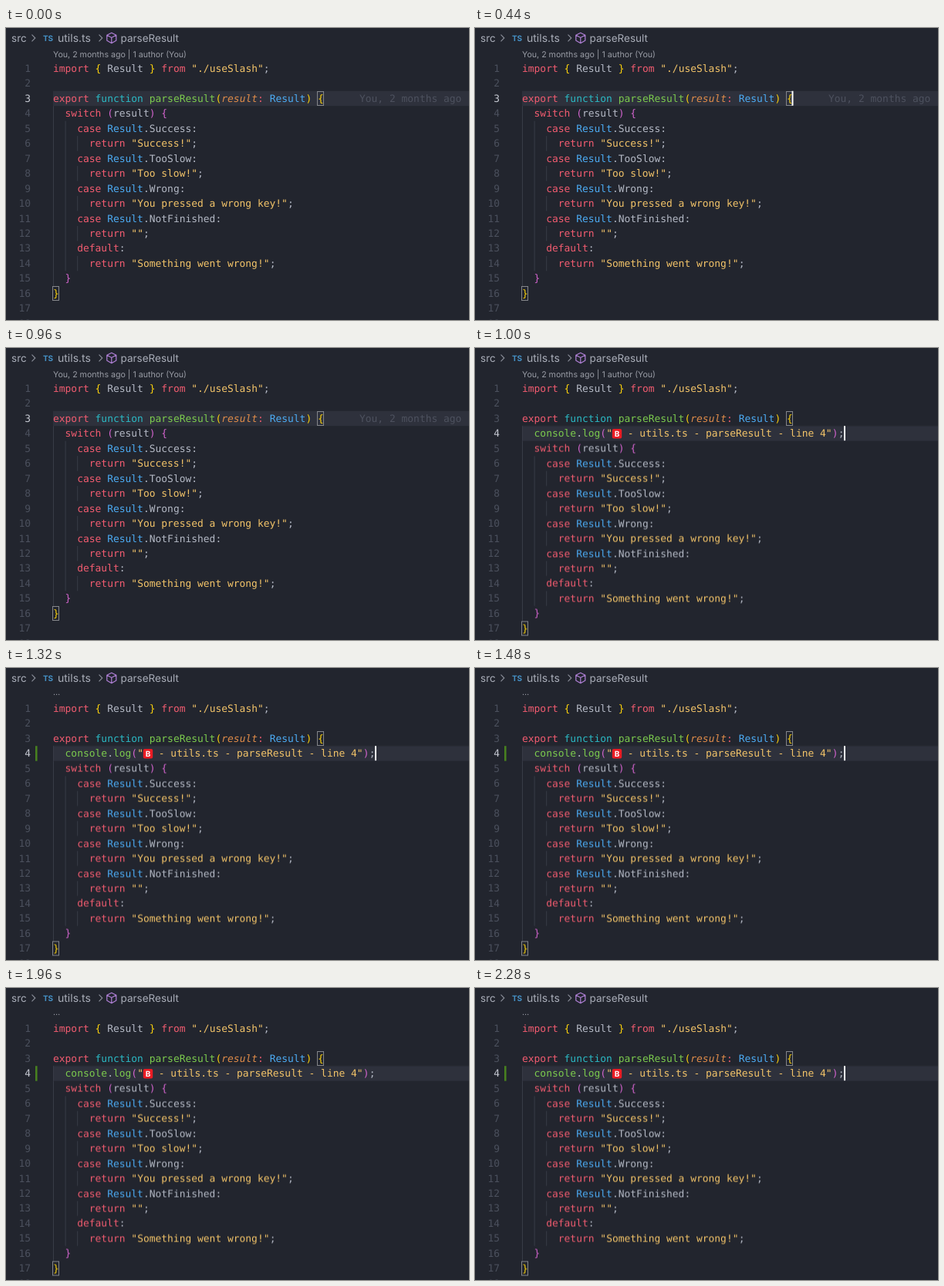
Write an HTML page that moves like this. It is 600 px wide and 379 px high and loops after 2.32 s.

```html
<!DOCTYPE html>
<html lang="en">
<head>
<meta charset="utf-8">
<style>
  html, body { margin: 0; width: 100%; height: 100%; overflow: hidden; background: #22252e; }
  svg { display: block; width: 600px; height: 379px; }
  text { white-space: pre; text-rendering: geometricPrecision; }
  .code { font: 12.95px "DejaVu Sans Mono", "Liberation Mono", monospace; }
  .ui { font-family: Inter, "Open Sans", sans-serif; }
  .w { fill: #b4b9c5; }
  .r { fill: #f25c70; }
  .g { fill: #7ccb4e; }
  .y { fill: #f3c469; }
  .b { fill: #4cabf3; }
  .c { fill: #2bbac5; }
  .o { fill: #e08c4a; font-style: italic; }
  .k { fill: #fbd20c; }
  .p { fill: #d264cd; }
  .num { fill: #4b505d; text-anchor: end; }
  .on { fill: #c6c9d2; }
  .blame { fill: #4d515e; }
  .crumb { fill: #a9adb8; }
  .lens { fill: #9a9da6; font-size: 10.65px; }
  .guide { fill: #383c47; }
  .match { fill: none; stroke: #85878c; }
</style>
</head>
<body>
<svg id="stage" viewBox="0 0 600 379" xmlns="http://www.w3.org/2000/svg"></svg>
<script>
(() => {
  const LOOP = 2320, INSERT = 1000, GIT = 1200;
  const LEFT = 61, CHAR = 7.796, ROW = 19.47, BASE = 56.8;
  const stage = document.getElementById('stage');

  function add(parent, tag, attrs, text) {
    const el = document.createElementNS('http://www.w3.org/2000/svg', tag);
    for (const key in attrs) el.setAttribute(key, attrs[key]);
    if (text) el.textContent = text;
    return parent.appendChild(el);
  }
  const group = () => add(stage, 'g', {});
  const rect = (parent, x, y, width, height, attrs) =>
    add(parent, 'rect', { x, y, width, height, ...attrs });
  const label = (parent, x, y, cls, text, attrs) =>
    add(parent, 'text', { x, y, class: cls, ...attrs }, text);

  const baseline = row => BASE + (row - 1) * ROW;
  const rowTop = row => baseline(row) - 14;
  const column = col => LEFT + col * CHAR;

  // tokens alternate class and text
  function line(parent, row, indent, tokens, x = column(indent)) {
    for (let i = 0; i < tokens.length; i += 2) {
      label(parent, x, baseline(row), 'code ' + tokens[i], tokens[i + 1]);
      x += tokens[i + 1].length * CHAR;
    }
  }
  const guide = (parent, col, first, last) =>
    rect(parent, column(col), rowTop(first), 1, (last - first + 1) * ROW, { class: 'guide' });
  const match = (parent, col, row) =>
    rect(parent, column(col) - 0.5, Math.round(rowTop(row)) + 0.5, 8, 18, { class: 'match' });

  // steps: [time, value] pairs, each value held until the next time
  function hold(el, prop, steps) {
    const frames = steps.map(([time, value]) =>
      ({ offset: time / LOOP, [prop]: value, easing: 'steps(1, end)' }));
    frames.push({ offset: 1, [prop]: steps[steps.length - 1][1] });
    el.animate(frames, { duration: LOOP, iterations: Infinity });
  }
  const before = (el, time) => hold(el, 'opacity', [[0, 1], [time, 0]]);
  const after = (el, time) => hold(el, 'opacity', [[0, 0], [time, 1]]);
  const pushDown = el =>
    hold(el, 'transform', [[0, 'translate(0px, 0px)'], [INSERT, `translate(0px, ${ROW}px)`]]);

  // current line
  pushDown(rect(group(), LEFT, rowTop(3), 600, ROW, { fill: '#2e313c' }));

  // breadcrumb
  const bar = group();
  const crumb = (x, text, size) =>
    label(bar, x, 17.5, 'ui crumb', text, { 'font-size': size });
  const chevron = x => add(bar, 'path', {
    d: `M${x} 8.7l4.3 4.3l-4.3 4.3`, fill: 'none', stroke: '#8d919c', 'stroke-width': 1.1
  });
  crumb(7, 'src', 13.5);
  chevron(33.5);
  label(bar, 48, 16.5, 'ui', 'TS', { 'font-size': 10, 'font-weight': 700, fill: '#4590c4' });
  crumb(67, 'utils.ts', 14);
  chevron(120.5);
  add(bar, 'path', {
    d: 'M136.8 6.3l6 3v7l-6 3.4l-6-3.4v-7zM130.8 9.3l6 3.2l6-3.2M136.8 12.5v7',
    fill: 'none', stroke: '#b180d7', 'stroke-width': 1.2, 'stroke-linejoin': 'round'
  });
  crumb(148.5, 'parseResult', 13.5);

  // author lens
  before(label(stage, LEFT, 37.8, 'ui lens', 'You, 2 months ago | 1 author (You)'), GIT);
  after(label(stage, LEFT, 34.5, 'ui lens', '…'), GIT);

  // line numbers; the active one changes from 3 to 4
  const number = (n, cls) => label(stage, 32, baseline(n), 'code num ' + cls, String(n));
  for (let n = 1; n <= 18; n++) {
    const dim = number(n, '');
    if (n === 3) {
      after(dim, INSERT);
      before(number(n, 'on'), INSERT);
    } else if (n === 4) {
      before(dim, INSERT);
      after(number(n, 'on'), INSERT);
    }
  }

  // fixed head
  const head = group();
  line(head, 1, 0, ['r', 'import ', 'k', '{ ', 'w', 'Result ', 'k', '} ', 'r', 'from ',
    'y', '"./useSlash"', 'w', ';']);
  line(head, 3, 0, ['r', 'export ', 'c', 'function ', 'g', 'parseResult', 'k', '(',
    'o', 'result', 'r', ': ', 'b', 'Result', 'k', ') {']);
  match(head, 44, 3);
  before(label(stage, 458, baseline(3), 'code blame', 'You, 2 months ago'), INSERT);

  // body pushed down by the new line
  const body = group();
  guide(body, 0, 4, 15);
  guide(body, 2, 5, 14);
  line(body, 4, 2, ['r', 'switch ', 'p', '(', 'w', 'result', 'p', ') {']);
  const cases = [
    ['Success', 'Success!'],
    ['TooSlow', 'Too slow!'],
    ['Wrong', 'You pressed a wrong key!'],
    ['NotFinished', ''],
    ['', 'Something went wrong!']
  ];
  cases.forEach(([name, reply], i) => {
    const row = 5 + i * 2;
    guide(body, 4, row + 1, row + 1);
    line(body, row, 4, name
      ? ['r', 'case ', 'b', 'Result', 'w', '.' + name + ':']
      : ['r', 'default', 'w', ':']);
    line(body, row + 1, 6, ['r', 'return ', 'y', `"${reply}"`, 'w', ';']);
  });
  line(body, 15, 2, ['p', '}']);
  line(body, 16, 0, ['k', '}']);
  match(body, 0, 16);
  pushDown(body);

  // inserted line
  const log = group();
  guide(log, 0, 4, 4);
  line(log, 4, 2, ['g', 'console', 'w', '.', 'g', 'log', 'p', '(', 'y', '"']);
  rect(log, 177.8, 105, 12.4, 12.4, { rx: 2, fill: '#ea1c24' });
  label(log, 184, 114.8, 'ui', 'B',
    { 'font-size': 10, 'font-weight': 700, fill: '#fff', 'text-anchor': 'middle' });
  line(log, 4, 0, ['y', ' - utils.ts - parseResult - line 4"', 'p', ')', 'w', ';'], 190);
  after(log, INSERT);
  after(rect(stage, 38, rowTop(4), 2.6, ROW, { fill: '#48801f' }), GIT);

  // blinking caret
  const caret = (x, row) => rect(stage, x, rowTop(row), 2, ROW - 0.5, { fill: '#fff' });
  hold(caret(410.5, 3), 'opacity', [[0, 0], [240, 1], [740, 0]]);
  hold(caret(478, 4), 'opacity', [[0, 0], [INSERT, 1], [1500, 0], [2000, 1]]);
})();
</script>
</body>
</html>
```
